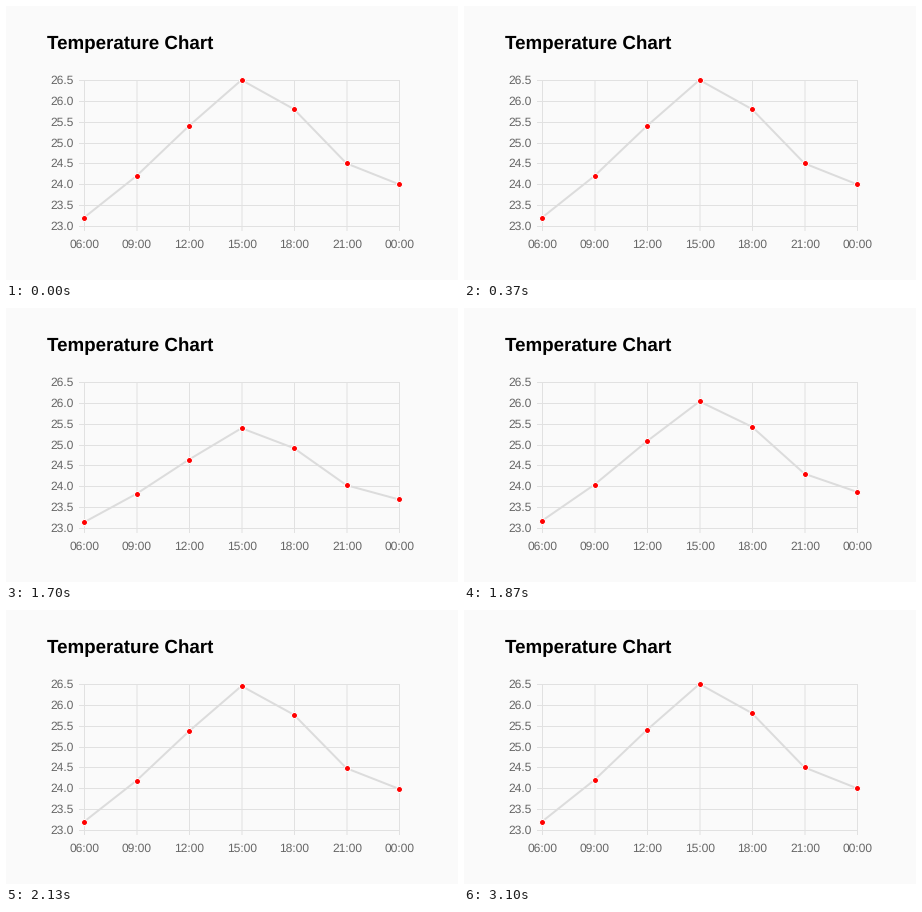
A matplotlib script for the animation above (4560 ms loop, 452 px wide and 274 px high).

```python
import numpy as np
import matplotlib.pyplot as plt
from matplotlib.animation import FuncAnimation

plt.rcParams["text.hinting"] = "none"

W, H, DPI = 452, 274, 64
LOOP, TICK = 4560, 10

PAPER = "#fafafa"
GRID = "#e1e1e1"
LINE = "#dcdcdc"
LABEL = "#666666"
DOT = "#ff0000"

LEFT, RIGHT, TOP, BOTTOM = 78, 393, 74, 220
LOW, HIGH = 23.0, 26.5
TEMPS = np.array([23.2, 24.2, 25.4, 26.5, 25.8, 24.5, 24.0])
HOURS = ["06:00", "09:00", "12:00", "15:00", "18:00", "21:00", "00:00"]

# The chart redraws in discrete steps while it grows.
STEPS = np.concatenate([1700 + 33 * np.arange(14), [2200],
                        2230 + 40 * np.arange(7)])


def pt(px):
    return px * 72 / DPI


def growth(ms):
    """Share of full height at a given time, with a quartic ease-out."""
    if ms < STEPS[0]:
        return 1.0
    shown = STEPS[np.searchsorted(STEPS, ms, side="right") - 1]
    t = np.interp(shown, [1700, 1870, 2470], [0.25, 0.4, 1])
    return 1 - (1 - t) ** 4


def heights(ms):
    full = (TEMPS - LOW) / (HIGH - LOW) * (BOTTOM - TOP)
    return BOTTOM - full * growth(ms)


fig = plt.figure(figsize=(W / DPI, H / DPI), dpi=DPI, facecolor=PAPER)
ax = fig.add_axes([0, 0, 1, 1])
ax.set(xlim=(0, W), ylim=(H, 0))
ax.axis("off")

xs = np.linspace(LEFT, RIGHT, len(HOURS))
levels = np.arange(LOW, HIGH + 0.1, 0.5)
rows = np.round(np.linspace(BOTTOM, TOP, len(levels)))

# Grid lines sit on pixel centres, half a pixel past the data positions.
grid = dict(color=GRID, lw=pt(1), zorder=1, snap=False)
ax.hlines(rows + 0.5, LEFT - 5, RIGHT, **grid)
ax.vlines(xs + 0.5, TOP, BOTTOM + 5, **grid)

font = dict(family="Liberation Sans", color=LABEL, fontsize=pt(12))
for level, y in zip(levels, rows):
    ax.text(67.5, y + 4.2, f"{level:.1f}", ha="right", va="baseline", **font)
for hour, x in zip(HOURS, xs):
    ax.text(x + 0.5, 242, hour, ha="center", va="baseline", **font)
ax.text(40.6, 43, "Temperature Chart", family="Liberation Sans",
        weight="bold", fontsize=pt(18.75), color="black", va="baseline")

curve, = ax.plot(xs, heights(0), color=LINE, lw=pt(2), zorder=2, snap=False)
dots, = ax.plot(xs, heights(0), "o", mfc=DOT, mec="white", ms=pt(6),
                mew=pt(1), zorder=3, snap=False)


def update(i):
    ys = heights(i * TICK)
    curve.set_ydata(ys)
    dots.set_ydata(ys)
    return curve, dots


anim = FuncAnimation(fig, update, frames=LOOP // TICK, interval=TICK,
                     init_func=lambda: update(0), repeat=True,
                     repeat_delay=0, blit=False)
plt.show()
```
